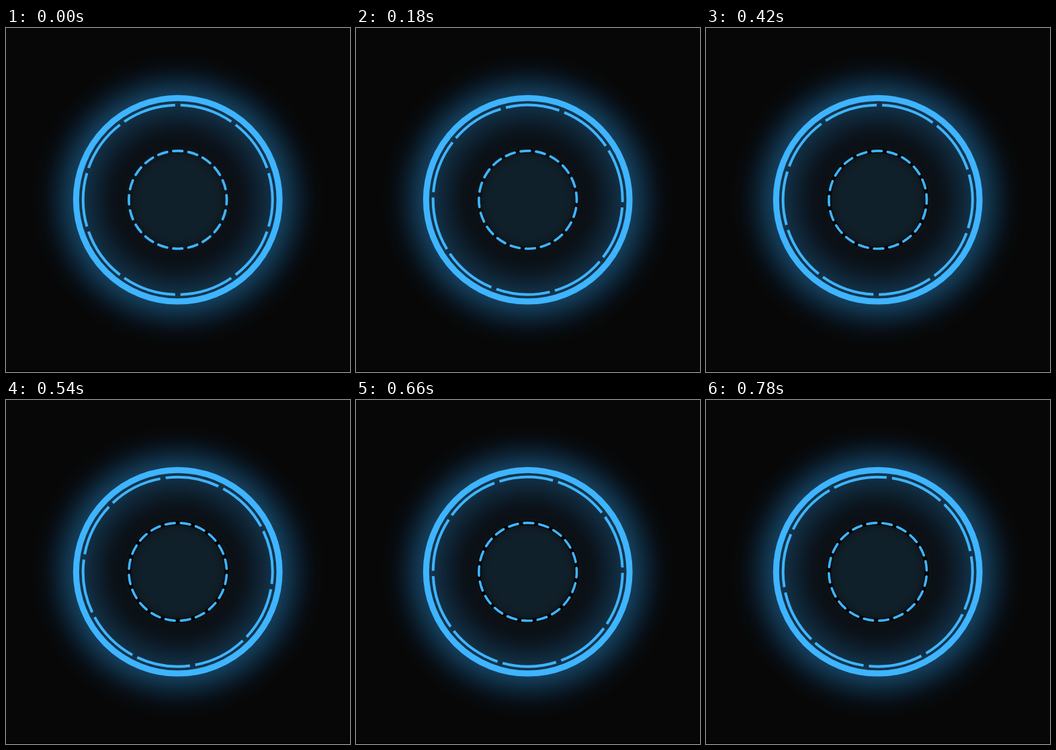
Recreate the animation shown at these times as an HTML page. Size 512x512 px, loop 0.84 s.

```html
<!DOCTYPE html>
<html lang="en">
<head>
<meta charset="utf-8">
<title>Rotating rings</title>
<style>
  html, body { margin: 0; width: 100%; height: 100%; overflow: hidden; background: #070707; }
  svg { display: block; width: 512px; height: 512px; }
  circle { fill: none; stroke: #3fb4ff; }
</style>
</head>
<body>
<svg viewBox="0 0 512 512">
  <defs>
    <radialGradient id="glow" gradientUnits="userSpaceOnUse" cx="0" cy="0" r="220">
      <stop offset="0" stop-color="#10202a"/>
      <stop offset=".24" stop-color="#10202a"/>
      <stop offset=".29" stop-color="#0f1d26"/>
      <stop offset=".33" stop-color="#0c151b"/>
      <stop offset=".37" stop-color="#0b1015"/>
      <stop offset=".44" stop-color="#0b1219"/>
      <stop offset=".5" stop-color="#0c1a26"/>
      <stop offset=".57" stop-color="#0f2536"/>
      <stop offset=".64" stop-color="#123147"/>
      <stop offset=".705" stop-color="#153e5b"/>
      <stop offset=".75" stop-color="#11334b"/>
      <stop offset=".795" stop-color="#0d2638"/>
      <stop offset=".84" stop-color="#0a1a27"/>
      <stop offset=".89" stop-color="#080f16"/>
      <stop offset=".94" stop-color="#070a0c"/>
      <stop offset="1" stop-color="#070707"/>
    </radialGradient>
  </defs>
  <rect y="510" width="512" height="2" fill="#000"/>
  <g transform="translate(255.7 255.7)">
    <circle r="220" style="fill:url(#glow);stroke:none"/>
    <circle r="151.4" stroke-width="9"/>
    <circle id="outer" r="141" stroke-width="4" pathLength="10"
      stroke-dasharray=".91 .09" stroke-dashoffset="-.045"/>
    <circle id="shade" r="72.8" style="stroke:#000" stroke-width="6"/>
    <circle id="inner" r="72.8" stroke-width="3.7" pathLength="20" stroke-linecap="round"
      stroke-dasharray=".6 .4" stroke-dashoffset=".3"/>
  </g>
</svg>
<script>
  const [outer, shade, inner] = ['outer', 'shade', 'inner'].map(id => document.getElementById(id));
  const STEP_MS = 60, STEPS = 14, STEP_DEG = 5;
  const start = performance.now();
  const rotate = (ring, degrees) => ring.setAttribute('transform', `rotate(${degrees - 90})`);

  function draw() {
    const step = Math.floor((performance.now() - start) / STEP_MS) % STEPS;
    rotate(outer, -STEP_DEG * step);
    rotate(inner, STEP_DEG * step);
    shade.setAttribute('opacity', Math.min(0.9, step / 9));
    requestAnimationFrame(draw);
  }
  draw();
</script>
</body>
</html>
```
